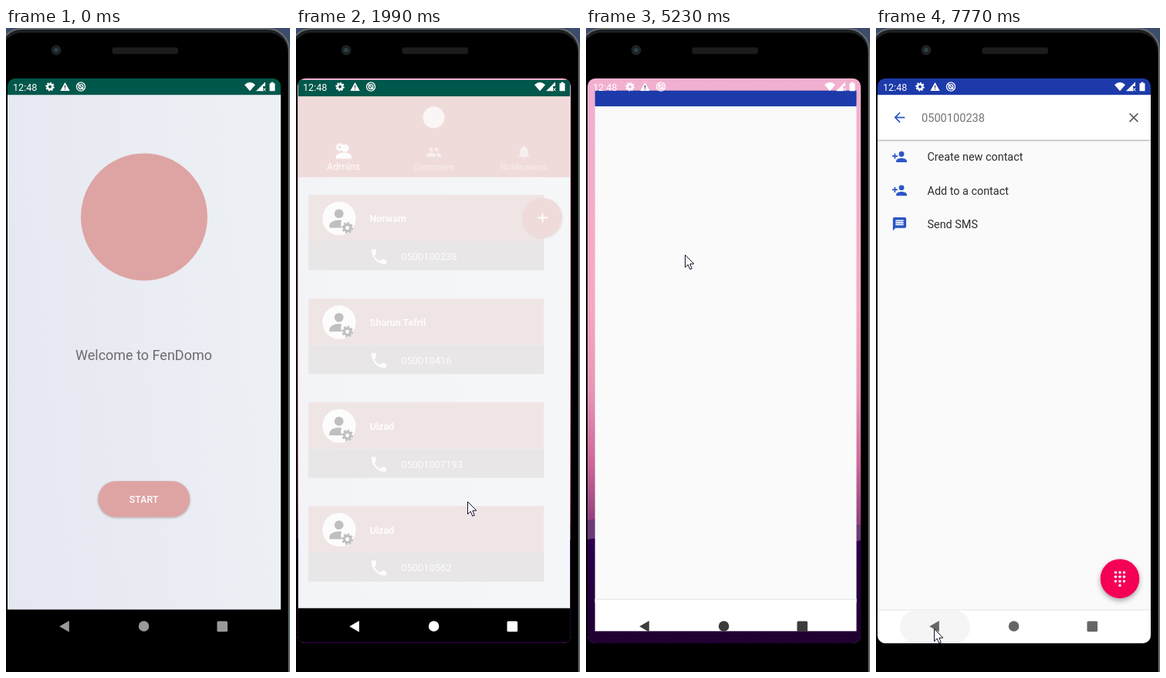
Recreate the animation shown at these times as an HTML page. Size 368x830 px, loop 8 s.

```html
<!DOCTYPE html>
<html lang="en">
<head>
<meta charset="utf-8">
<style>
  html, body { margin: 0; width: 100%; height: 100%; overflow: hidden; background: #000; }
  svg { display: block; width: 368px; height: 830px; font-family: Roboto, sans-serif; }
  .raised { filter: drop-shadow(0 1.5px 1.5px #0004); }
</style>
</head>
<body>
<svg id="stage" viewBox="0 0 368 830"></svg>
<script>
const LOOP = 8000;
const PINK = '#dea4a3', TEAL = '#00574b', BLUE = '#1c3aa9', ACCENT = '#2a56c6', PAPER = '#fafafa';
const CENTER = { x: 179, y: 429 }, WIDTH = 354;
const NUMBER = '0500100238';

const ICONS = {
  call: 'M6.62 10.79c1.44 2.83 3.76 5.14 6.59 6.59l2.2-2.2c.27-.27.67-.36 1.02-.24 1.12.37 2.33.57 3.57.57.55 0 1 .45 1 1V20c0 .55-.45 1-1 1-9.39 0-17-7.61-17-17 0-.55.45-1 1-1h3.5c.55 0 1 .45 1 1 0 1.25.2 2.45.57 3.57.11.35.03.74-.25 1.02z',
  addPerson: 'M15 12a4 4 0 1 0 0-8 4 4 0 0 0 0 8zM6 10V7H4v3H1v2h3v3h2v-3h3v-2zm9 4c-2.67 0-8 1.34-8 4v2h16v-2c0-2.66-5.33-4-8-4z',
  message: 'M20 2H4a2 2 0 0 0-2 2v18l4-4h14a2 2 0 0 0 2-2V4a2 2 0 0 0-2-2zm-2 12H6v-2h12zm0-3H6V9h12zm0-3H6V6h12z',
  people: 'M16 11a3 3 0 1 0 0-6 3 3 0 0 0 0 6zm-8 0a3 3 0 1 0 0-6 3 3 0 0 0 0 6zm0 2c-2.33 0-7 1.17-7 3.5V19h14v-2.5C15 14.17 10.33 13 8 13zm8 0-.97.05C16.2 13.9 17 15 17 16.5V19h6v-2.5c0-2.33-4.67-3.5-7-3.5z',
  bell: 'M12 22a2 2 0 0 0 2-2h-4c0 1.1.9 2 2 2zm6-6v-5c0-3.07-1.64-5.64-4.5-6.32V4a1.5 1.5 0 0 0-3 0v.68C7.63 5.36 6 7.92 6 11v5l-2 2v1h16v-1z',
  erase: 'M22 3H7c-.7 0-1.23.35-1.6.88L0 12l5.4 8.11c.37.53.9.89 1.6.89h15a2 2 0 0 0 2-2V5a2 2 0 0 0-2-2zm-3 12.6L17.6 17 14 13.4 10.4 17 9 15.6l3.6-3.6L9 8.4 10.4 7l3.6 3.6L17.6 7 19 8.4 15.4 12z',
  back: 'M20 11H7.83l5.59-5.59L12 4l-8 8 8 8 1.41-1.41L7.83 13H20z',
  close: 'M19 6.4 17.6 5 12 10.6 6.4 5 5 6.4l5.6 5.6L5 17.6 6.4 19l5.6-5.6 5.6 5.6 1.4-1.4-5.6-5.6z'
};

// Drawing helpers
const rect = (x, y, w, h, fill, extra = '') => `<rect x="${x}" y="${y}" width="${w}" height="${h}" fill="${fill}" ${extra}/>`;
const circle = (x, y, r, fill, extra = '') => `<circle cx="${x}" cy="${y}" r="${r}" fill="${fill}" ${extra}/>`;
const path = (d, fill, extra = '') => `<path d="${d}" fill="${fill}" ${extra}/>`;
const line = (d, color, width) => path(d, 'none', `stroke="${color}" stroke-width="${width}"`);
const text = (x, y, size, fill, str, extra = '') => `<text x="${x}" y="${y}" font-size="${size}" fill="${fill}" ${extra}>${str}</text>`;
const label = (x, y, size, fill, str, extra = '') => text(x, y, size, fill, str, 'text-anchor="middle" ' + extra);
const group = (id, body, extra = '') => `<g id="${id}" ${extra}>${body}</g>`;
const icon = (name, x, y, fill, size = 20.7, extra = '') =>
  path(ICONS[name], fill, `transform="translate(${x - size / 2} ${y - size / 2}) scale(${size / 24})" ${extra}`);
const gear = (x, y, r, color) =>
  circle(x, y, r * .58, 'none', `stroke="${color}" stroke-width="${r * .45}"`) +
  circle(x, y, r * .85, 'none', `stroke="${color}" stroke-width="${r * .36}" pathLength="16" stroke-dasharray="1.1 .9"`);

function card(id, bar, background, nav, content) {
  return group(id,
    rect(2, 80, WIDTH, 675, PAPER) +
    group(id + 'Body', rect(2, 86, WIDTH, 664, background) + content, 'clip-path="url(#body)"') +
    rect(2, 65, WIDTH, 21.2, bar) + rect(2, 749.5, WIDTH, 43.5, nav) +
    (nav === '#fff' ? rect(2, 749.5, WIDTH, 1, '#e2e2e2') : ''));
}

const welcome = circle(179, 243.5, 82, PINK) +
  label(178.5, 428, 18, '#6f6b6d', 'Welcome to FenDomo') +
  rect(119.3, 584, 119, 46.3, PINK, 'rx="23.1" class="raised"') +
  `<g clip-path="url(#button)">${circle(222, 610, 0, '#fff', 'id="buttonRipple"')}</g>` +
  label(178.7, 612, 12.2, '#fff', 'START', 'font-weight="500" letter-spacing=".25"');

function contact([name, phone], i) {
  return `<g transform="translate(0 ${i * 134.5})">` +
    rect(15, 213.7, 307, 60.3, '#debebf') + rect(15, 274, 307, 37.6, '#c8c3c4') +
    circle(55.2, 244.5, 21.8, '#fff') + circle(55, 238.2, 5.9, '#565656') +
    path('M42.5 256.5v-3q1-6.5 13-7l3 .3q-2 5 0 9.7z', '#565656') + gear(66, 256.5, 7.2, '#565656') +
    text(95, 249.5, 12.6, '#fff', name, 'font-weight="700"') +
    icon('call', 107, 294, '#fff', 26) + text(136, 298.5, 13, '#fff', phone) + '</g>';
}
const contacts = [['Norwam', NUMBER], ['Shorun Tefril', '050010416'], ['Ulzad', '05001007193'], ['Ulzad', '050010562']];
const admin = rect(2, 86, WIDTH, 105, PINK) + circle(178.5, 113.5, 14, '#f8eeee') +
  gear(56, 152, 5.2, '#fff') + circle(63, 153.5, 5, '#fff') + path('M51 167v-3q2-5 11-5 8 0 9.5 5v3z', '#fff') +
  label(60.8, 182, 12.7, '#fff', 'Admins') +
  `<g opacity=".6">${icon('people', 178.5, 158.5, '#fff')}${label(178.5, 182, 10.9, '#fff', 'Customers')}` +
  `${icon('bell', 296, 158.5, '#fff')}${label(296, 182, 10.9, '#fff', 'Notifications')}</g>` +
  contacts.map(contact).join('') +
  circle(320.3, 243.5, 25.5, PINK, 'class="raised"') + line('M314 243.5h12.6M320.3 237.2v12.6', '#fff', 1.8);

const actions = [['addPerson', 'Create new contact'], ['addPerson', 'Add to a contact'], ['message', 'Send SMS']]
  .map(([name, str], i) => icon(name, 30.5, 108 + i * 43.3, ACCENT) + text(66.5, 113.3 + i * 43.3, 14.4, '#2e2e2e', str)).join('');
const letters = ['', 'ABC', 'DEF', 'GHI', 'JKL', 'MNO', 'PQRS', 'TUV', 'WXYZ'];
const keys = letters.map((str, i) => {
  const x = 65.3 + i % 3 * 113, y = 469.5 + Math.floor(i / 3) * 57.5;
  return label(x, y, 31.5, ACCENT, i + 1, 'font-weight="300"') + label(x, y + 15.3, 10.7, '#5c5c5c', str);
}).join('');
const voicemail = [61, 69].map(x => circle(x, 481.3, 3.2, 'none', 'stroke="#5c5c5c" stroke-width="1.6"')).join('') + line('M61 484.5h8', '#5c5c5c', 1.6);
const dialpad = rect(2, 371, WIDTH, 380, '#fff', 'style="filter:drop-shadow(0 -1px 2px #0004)"') +
  rect(2, 425.5, WIDTH, 1, '#e6e6e6') + [392.5, 398.5, 404.5].map(y => circle(27, y, 1.8, '#616161')).join('') +
  label(179.7, 410, 30.9, '#616161', NUMBER) + icon('erase', 331, 398.5, '#616161', 21.5) + keys + voicemail +
  label(178.3, 642.5, 31.5, ACCENT, '0', 'font-weight="300"') + label(178.3, 658, 10.7, '#5c5c5c', '+') +
  label(65.3, 653, 34, '#757575', '*', 'font-weight="300"') + label(291.3, 642.5, 21, '#757575', '#', 'font-weight="300"') +
  circle(178.5, 709.7, 25.5, '#00c853', 'style="filter:drop-shadow(0 3px 3px #0005)"') + icon('call', 178.5, 709.7, '#fff');
const searchBar = rect(2, 86, WIDTH, 58, '#fff', 'style="filter:drop-shadow(0 1px 1px #0005)"') +
  icon('back', 30.5, 115.3, ACCENT) + text(59, 120.5, 14.6, '#757575', NUMBER) + icon('close', 334, 115.5, '#616161');
const dots = [0, 1, 2, 3, 4, 5, 6, 7, 8, 10].map(i => circle(-5.5 + i % 3 * 5.5, -8 + Math.floor(i / 3) * 5.6, 1.75, '#fff')).join('');
const dialer = group('actions', actions) + group('searchBar', searchBar) + group('dialpad', dialpad) +
  group('fab', circle(0, 0, 25.3, '#f50057', 'style="filter:drop-shadow(0 3px 3px #0005)"') + dots);

const statusIcons = text(9, 80.5, 12.6, '#fff', '12:48') + gear(57, 75.7, 5.6, '#fff') +
  path('M76.5 70l6.2 11h-12.4z', '#fff') + line('M76.5 74v3.3M76.5 78.3v1.3', '#335', 1.2) +
  circle(97, 75.7, 5.5, 'none', 'stroke="#fff" stroke-width="1.3"') + circle(97, 75.7, 2.8, 'none', 'stroke="#fff" stroke-width="1.3"') +
  line('M93.5 72.2l7 7', '#fff', 1.3) + path('M309 73.2Q316 67 323 73.2L316 81.3z', '#fff') +
  path('M324 81.3L336 69.5V75h-3v6.3z', '#fff') + line('M333 77.3l3.5 4M336.5 77.3l-3.5 4', '#fff', 1) +
  path('M341.5 71.2h2v-1.5h3v1.5h2v10.1h-7z', '#fff');
const navIcons = path('M69.2 771.2L81.8 764V778.4z', 'inherit') +
  circle(178.6, 771, 6.8, 'inherit') + rect(273.5, 764.4, 13.6, 13.6, 'inherit', 'rx="1.5"');

const gradient = (id, dir, stops) => `<linearGradient id="${id}" ${dir}>` +
  stops.map(([at, color]) => `<stop offset="${at}" stop-color="${color}"/>`).join('') + '</linearGradient>';
const clip = (id, x, y, w, h, r) => `<clipPath id="${id}">${rect(x, y, w, h, '#000', `rx="${r}"`)}</clipPath>`;

document.getElementById('stage').innerHTML = '<defs>' +
  gradient('pale', 'x1="0" y1=".6" x2="1" y2=".4"', [[0, '#e5e8f1'], [1, '#edf0f4']]) +
  gradient('sky', 'x1="0" y1="0" x2="0" y2="1"', [[0, '#f2b0d0'], [.4, '#f6a8c4'], [.55, '#e797b8'], [.68, '#cd6899'], [.78, '#94427f'], [1, '#733c7d']]) +
  gradient('hill', 'x1="0" y1="0" x2="0" y2="1"', [[0, '#2c0050'], [1, '#200030']]) +
  clip('screen', 2, 65, WIDTH, 728, 10) + clip('body', 2, 86, WIDTH, 664, 0) + clip('button', 119.3, 584, 119, 46.3, 23.1) + '</defs>' +
  rect(0, 0, 368, 830, '#3d4c6b') + rect(-8, 1, 375, 900, '#1d2022', 'rx="28" stroke="#676c6f" stroke-width="2"') +
  rect(-5, 6, 370, 900, '#000', 'rx="25"') +
  rect(137.5, 25, 85.5, 8.5, '#1c1c1d', 'rx="3"') + circle(65, 28.5, 6.5, '#1c2224') + circle(65, 28.5, 2.8, '#2f4047') +
  '<g clip-path="url(#screen)">' +
  group('wallpaper', rect(2, 65, WIDTH, 728, 'url(#sky)') +
    path('M2 634L60 628Q180 645 356 640V793H2z', '#6d3a78') + path('M2 659L60 652Q170 656 240 666T356 660V793H2z', 'url(#hill)')) +
  card('welcome', TEAL, 'url(#pale)', '#000', welcome) + card('admin', TEAL, 'url(#pale)', '#000', admin) +
  card('dialer', BLUE, PAPER, '#fff', dialer) +
  rect(31, 750.5, 91, 42.5, '#f5f5f5', 'rx="21" id="navRipple"') + statusIcons + group('nav', navIcons) + '</g>' +
  circle(128, 292, 15, '#fff', 'id="tap" opacity=".35"') +
  path('M.5.5V16.5L4.2 13 6.8 19 9.3 18 6.8 12H11.8z', '#fff', 'id="cursor" stroke="#17102c"');

const el = Object.fromEntries([...document.querySelectorAll('[id]')].map(node => [node.id, node]));
const set = (name, attr, value) => el[name].setAttribute(attr, value);
const show = (name, on) => set(name, 'visibility', on ? 'visible' : 'hidden');

// Motion helpers
const ramp = (t, start, length) => Math.min(1, Math.max(0, (t - start) / length));
const smooth = s => s * s * (3 - 2 * s);

// Cubic bezier (x1, 0, x2, 1)
function ease(x, x1 = .4, x2 = .2) {
  let low = 0, high = 1;
  for (let i = 0; i < 20; i++) {
    const s = (low + high) / 2, u = 1 - s;
    if (3 * u * u * s * x1 + 3 * u * s * s * x2 + s ** 3 < x) low = s; else high = s;
  }
  return smooth(low);
}

function track(points, t, curve = s => s) {
  const next = points.findIndex(p => p[0] > t);
  if (next < 1) return points[next < 0 ? points.length - 1 : 0].slice(1);
  const a = points[next - 1], b = points[next], k = curve((t - a[0]) / (b[0] - a[0]));
  return a.slice(1).map((v, i) => v + (b[i + 1] - v) * k);
}

const pointer = [[280, 284, 776], [900, 222, 610], [2230, 222, 610], [2990, 120, 158], [3100, 120, 155], [3610, 138, 252],
  [3840, 138, 260], [4000, 137, 260], [4300, 128, 292], [6200, 128, 292], [6201, 104, 828], [6770, 80, 774], [6930, 75, 774]];
const navGray = [[0, 154], [1519, 154], [1520, 255], [2230, 255], [2460, 150], [4849, 150], [4850, 255], [4930, 232],
  [5150, 60], [5540, 60], [5770, 117], [7230, 117], [7300, 102]];

// Cards shrink, slide past each other, then grow back
function switchCards(from, to, t, start) {
  const age = t - start;
  const scale = 1 - .05 * ease(ramp(age, 0, 214)) + .05 * ease(ramp(age, 340, 260));
  const slide = ease(ramp(age, 0, 450), .2, 0), span = 1.05 * WIDTH * scale;
  const place = (name, dx) => {
    show(name, true);
    set(name, 'transform', `translate(${CENTER.x + dx} ${CENTER.y}) scale(${scale}) translate(${-CENTER.x} ${-CENTER.y})`);
  };
  if (slide < 1) place(from, -span * slide);
  if (slide > 0) place(to, span * (1 - slide));
  show('wallpaper', scale < 1);
}

function draw(t) {
  ['welcome', 'admin', 'dialer'].forEach(name => show(name, false));
  if (t < 1520) switchCards('welcome', 'admin', 0, 0);
  else if (t < 4850) switchCards('welcome', 'admin', t, 1490);
  else switchCards('admin', 'dialer', t, 4838);

  set('buttonRipple', 'r', 110 * ramp(t, 1030, 200));
  set('buttonRipple', 'opacity', .25 * (1 - ramp(t, 1200, 90)));
  set('adminBody', 'opacity', ramp(t, 1955, 100));
  set('dialerBody', 'opacity', ramp(t, 5985, 127));

  const swap = ease(ramp(t, 7290, 300));
  set('dialpad', 'transform', `translate(0 ${390 * swap})`);
  set('actions', 'transform', `translate(0 ${58 * swap})`);
  set('searchBar', 'transform', `translate(0 ${-62 * (1 - swap)})`);
  set('fab', 'transform', `translate(316 709.7) scale(${ease(ramp(t, 7540, 210))})`);

  const gray = Math.round(track(navGray, t)[0]);
  set('nav', 'fill', `rgb(${gray},${gray},${gray})`);
  set('navRipple', 'opacity', ramp(t, 7230, 120));
  show('tap', t >= 4470 && t < 4700);
  show('cursor', t >= 280 && t < 5600 || t > 6201);
  set('cursor', 'transform', `translate(${track(pointer, t, smooth)})`);
}

function frame() {
  draw(performance.now() % LOOP);
  requestAnimationFrame(frame);
}
frame();
</script>
</body>
</html>
```
